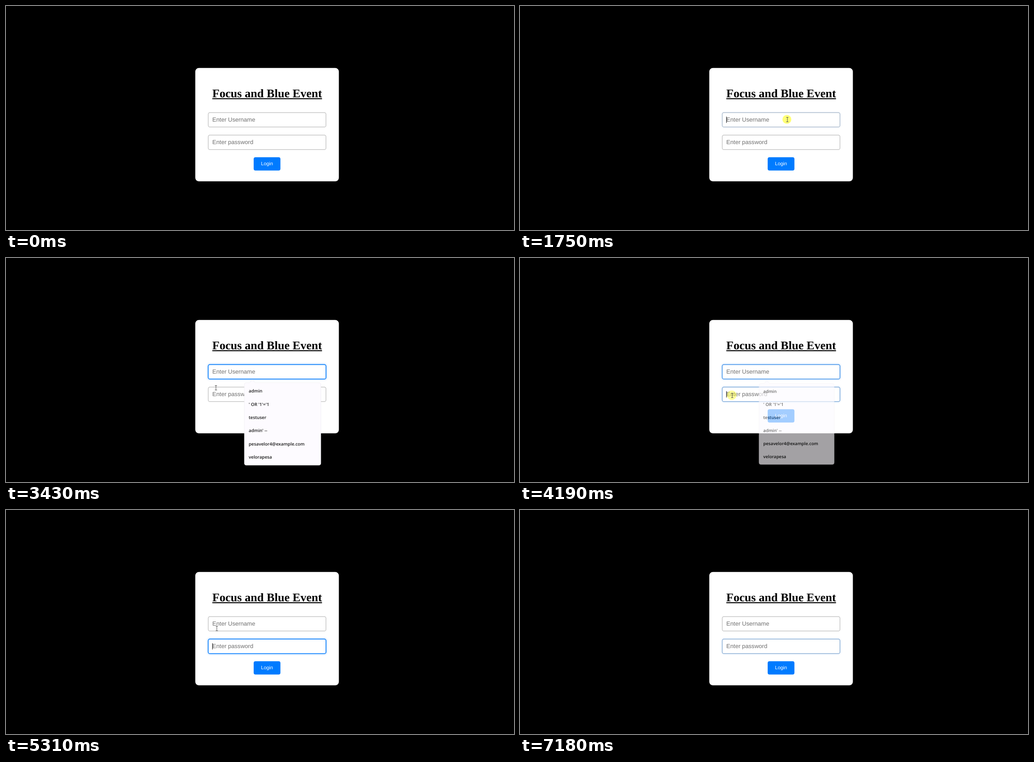
These frames come from a looping animation (1124x498 px, 7250 ms). An HTML page:

```html
<!DOCTYPE html>
<html lang="en">
<head>
<meta charset="utf-8">
<title>Focus and Blue Event</title>
<style>
  html, body { margin: 0; width: 100%; height: 100%; overflow: hidden; background: #000; }
  svg { display: block; text-rendering: geometricPrecision; }
  .field rect { fill: #fff; stroke: #c6c6c6; stroke-width: 1.5; }
  .field .focus { stroke: #007bff; filter: drop-shadow(0 0 2px rgba(0, 123, 255, .5)); }
  .field text { font: 13.04px "Liberation Sans", Arial, sans-serif; fill: #707070; }
  .field .caret { fill: #000; stroke: none; }
  .title { font: bold 26.08px "Liberation Serif", "Times New Roman", serif; }
  .button { font: 10.87px "Liberation Sans", Arial, sans-serif; fill: #fff; }
  #popup { font: 600 9.8px "Open Sans", "Noto Sans", sans-serif; fill: #1b1b1b; transform-origin: 612px 367px; }
  #popup path { fill: #fdfbff; stroke: #ebe9ee; stroke-width: .6; }
</style>
</head>
<body>
<svg width="1124" height="498" viewBox="0 0 1124 498">
  <rect width="1124" height="498"/>
  <rect x="418.8" y="137.8" width="317.7" height="252" rx="8" fill="#fff"/>
  <text class="title" x="456.5" y="203.3">Focus and Blue Event</text>
  <rect x="456.5" y="205" width="242.7" height="2.2"/>
  <g id="fields"></g>
  <rect x="548" y="336.2" width="59.2" height="29.5" rx="4" fill="#007bff"/>
  <text class="button" x="564.2" y="354.2">Login</text>
  <g id="popup"><path d="M532 277.3H539L545 270.5L551 277.3H692Q696.7 277.3 696.7 282V456Q696.7 460.7 692 460.7H532Q527.3 460.7 527.3 456V282Q527.3 277.3 532 277.3Z"/></g>
  <circle id="ripple" fill="#ff0"/>
  <g id="cursor">
    <path id="arrow" d="M0 0V11L2.5 8.7L4.2 12.3L6 11.5L4.4 8H8Z" fill="#fff" stroke="#000" stroke-width=".7"/>
    <path id="beam" d="M-2.5 -5H2.5M0 -5V5M-2.5 5H2.5" fill="none" stroke="#555"/>
  </g>
</svg>
<script>
const LOOP = 7250, BLINK = 530, ENTER = 760, LEAVE = 5780;
const $ = id => document.getElementById(id);
const clamp = v => Math.max(0, Math.min(1, v));
const progress = (t, start, end) => clamp((t - start) / (end - start));
const show = (el, on) => el.style.display = on ? "" : "none";

// Pointer moves, each continuing from the last one.
const origin = { x: 1059, y: 479 };
const moves = [
  { start: ENTER, end: 1040, x: 598.5, y: 246.5 },
  { start: 1250, end: 1460, x: 591.5, y: 252.5 },
  { start: 2780, end: 3430, x: 464.5, y: 288.5 },
  { start: 3430, end: 3840, x: 469.5, y: 305.5 },
  { start: 4980, end: 5310, x: 466.5, y: 263.5 },
  { start: 5440, end: 5700, x: 778, y: 371 }
];

const fields = [
  { label: "Enter Username", y: 236.9, focus: 1720, blur: 4120 },
  { label: "Enter password", y: 287.1, focus: 4120, blur: 7040 }
];

for (const f of fields) {
  const box = `x="447.5" y="${f.y}" width="260.4" height="32.2" rx="3.6"`;
  $("fields").insertAdjacentHTML("beforeend", `<g class="field">
    <rect ${box}/><rect class="focus" ${box}/>
    <text x="456.6" y="${f.y + 20.1}">${f.label}</text>
    <rect class="caret" x="456.4" y="${f.y + 9}" width="1" height="14"/></g>`);
  const group = $("fields").lastElementChild;
  f.ring = group.querySelector(".focus");
  f.caret = group.querySelector(".caret");
}

["admin", "' OR '1'='1", "testuser", "admin' --", "pesavelor4@example.com", "velorapesa"]
  .forEach((item, i) => $("popup").insertAdjacentHTML("beforeend",
    `<text x="537" y="${299.3 + i * 29.35}">${item}</text>`));

// Close to the CSS "ease" curve over 300 ms.
const ease = ms => 1 - (1 - clamp(ms / 300) ** 1.4) ** 3;

function drawFields(t) {
  for (const f of fields) {
    const age = t - f.focus;
    f.ring.style.opacity = ease(age) - ease(t - f.blur);
    show(f.caret, age >= 0 && t < f.blur && Math.floor(age / BLINK) % 2 === 0);
  }
}

function drawPopup(t) {
  const [user] = fields;
  const shown = progress(t, user.focus + 40, user.focus + 180) - progress(t, user.blur, user.blur + 200);
  $("popup").style.opacity = shown;
  $("popup").style.transform = `scale(${.95 + .05 * shown})`;
}

function pointerAt(t) {
  let { x, y } = origin;
  for (const m of moves) {
    const u = progress(t, m.start, m.end), k = u * (2 - u);
    x += (m.x - x) * k;
    y += (m.y - y) * k;
  }
  return { x, y };
}

function drawCursor(t) {
  const { x, y } = pointerAt(t);
  const overField = x > 447 && x < 709 && fields.some(f => y > f.y - 1 && y < f.y + 33);
  $("cursor").setAttribute("transform", `translate(${x} ${y})`);
  show($("cursor"), t >= ENTER && t < LEAVE);
  show($("beam"), overField);
  show($("arrow"), !overField);
}

function drawRipple(t) {
  const click = fields.find(f => t >= f.focus - 60 && t < f.focus + 120);
  show($("ripple"), click);
  if (!click) return;
  const age = t - click.focus + 60, { x, y } = pointerAt(t);
  $("ripple").setAttribute("cx", x - 1);
  $("ripple").setAttribute("cy", y - .5);
  $("ripple").setAttribute("r", 8 + age * .02);
  $("ripple").setAttribute("opacity", .9 - age * .004);
}

function draw(now) {
  const t = now % LOOP;
  drawFields(t);
  drawPopup(t);
  drawRipple(t);
  drawCursor(t);
  requestAnimationFrame(draw);
}
requestAnimationFrame(draw);
</script>
</body>
</html>
```
